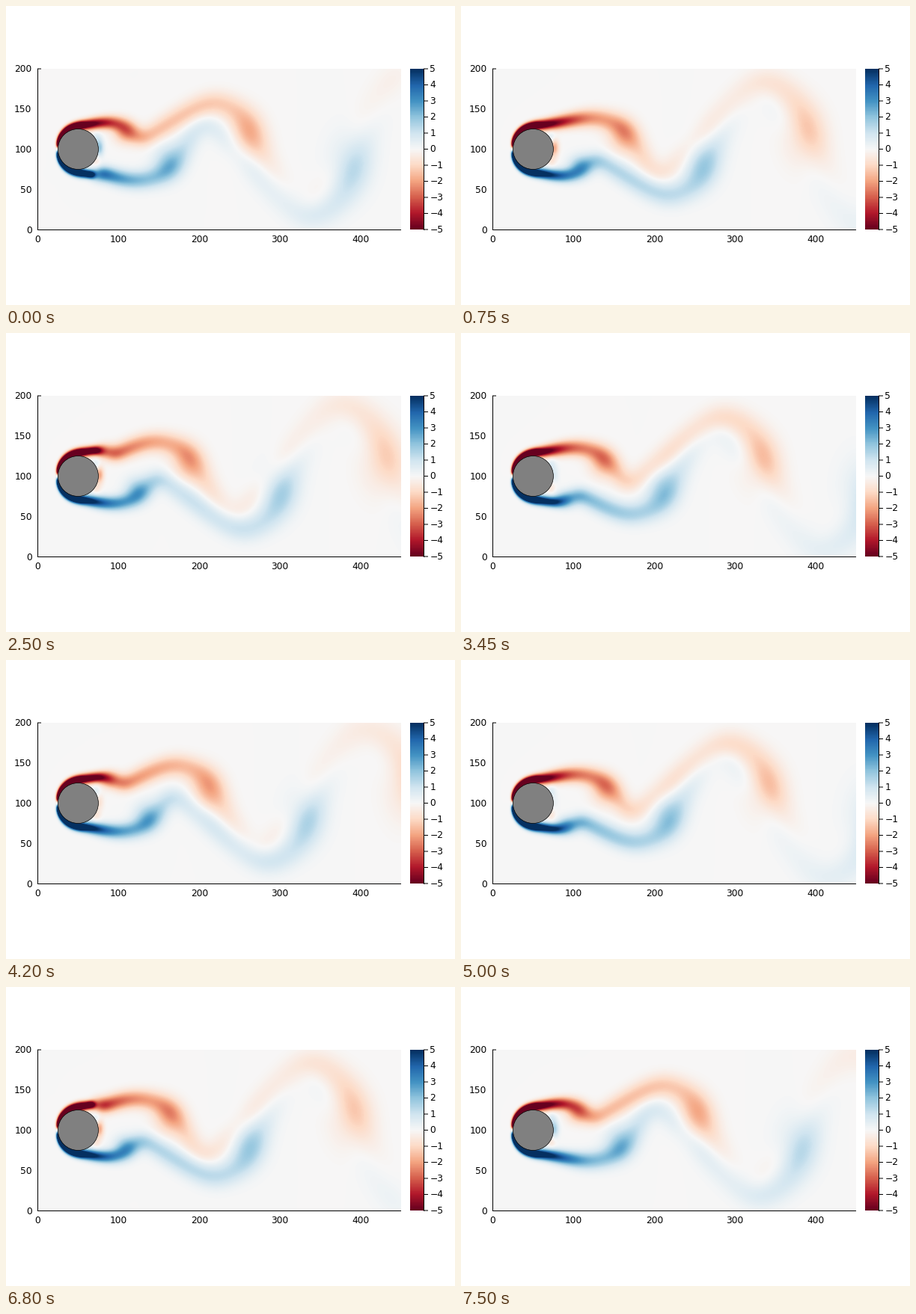
These frames come from a looping animation (600 px wide and 400 px high, 7.55 s). A matplotlib script:

```python
import numpy as np
import matplotlib.pyplot as plt
from matplotlib.animation import FuncAnimation
from matplotlib.patches import Circle

FRAMES, INTERVAL = 151, 50
PERIOD = 30.2                       # shedding period in frames
LEFT, RIGHT, TOP, BOTTOM = 43, 528, 84, 299
MID = (TOP + BOTTOM) / 2
CX, RADIUS = 96.4, 27

X = np.arange(LEFT, RIGHT) + 0.5
V = MID - (np.arange(TOP, BOTTOM) + 0.5)   # height above the centre line


def logistic(u):
    return 1 / (1 + np.exp(-u))


def drift(age, start, slow, gain, when, ease):
    """Position that speeds up smoothly from `slow` to `slow + gain`."""
    return start + slow * age + gain * ease * np.log1p(np.exp((age - when) / ease))


# Three landmarks of a vortex by age: x, height, log strength, width
def crest(age):
    return (drift(age, 134, 1.2, 7.4, 16, 5), 34 + 72 * logistic((age - 34) / 9),
            np.log(4) - age / 27, 6 + 0.17 * age)


def head(age):
    return (drift(age, 168, 3.2, 6.15, 20, 5), 20 + 15 * logistic(-(age + 4) / 3),
            np.log(2) - age / 50, 9 + 0.14 * age)


def foot(age):
    return (drift(age, 178, 3.2, 6.4, 11, 6), 38 - 136 * logistic((age - 14) / 9),
            np.log(1.6) - age / 15, 8.5 + 0.1 * age)


def core(age):
    """Soft rolled-up patch inside the head: x, height, strength, widths."""
    x, v, _, _ = head(age)
    strength = 1.5 * np.exp(-age / 70) * logistic((age + 6) / 3)
    return x - 10, v - 3, strength, 10.5 + 0.2 * age, 9.5 + 0.42 * age


def splat(x, v, weight, sx, sv=None):
    """Sum of Gaussian spots on the pixel grid."""
    x, v, weight, sx, sv = (np.atleast_1d(q)[:, None]
                            for q in (x, v, weight, sx, sx if sv is None else sv))
    gx = np.exp(-0.5 * ((X - x) / sx) ** 2)
    gv = np.exp(-0.5 * ((V - v) / sv) ** 2)
    return (gv * weight).T @ gx


def ribbon(x, v, strength, length, width):
    return splat(x, v, strength * length / (width * np.sqrt(2 * np.pi)), width)


def attached_layer(n=80):
    """Thin layer clinging to the front of the cylinder."""
    t = (np.arange(n) + 0.5) / n
    ang = np.radians(177 - 95 * t)
    r = RADIUS + 0.3 + 4.5 * t
    return ribbon(CX + r * np.cos(ang), r * np.sin(ang),
                  8.5 * (1 - np.exp(-t / 0.08)), r * np.radians(95) / n, 1.4 + 2.7 * t)


LAYER = attached_layer()
REAR = splat(125, 2, 1, 4, 8)
CORNERS = splat(121, 16, 0.6, 4, 6) - splat(121, -16, 0.6, 4, 6)


def hermite(a, b, ma, mb, t):
    return ((2 * t**3 - 3 * t**2 + 1) * a + (t**3 - 2 * t**2 + t) * ma
            + (3 * t**2 - 2 * t**3) * b + (t**3 - t**2) * mb)


def nodes_of(age):
    """Landmarks with the direction the ribbon takes through each."""
    k, h, f = crest(age), head(age), foot(age)
    dx = h[0] - k[0]
    return [(k, (1.25 * dx, 0)),
            (h, (0.5 * dx, 1.7 * (h[1] - k[1]))),
            (f, (1.2 * (f[0] - h[0]), 0))]


def wake(phase, n=26):
    """Strength of the upper shear layer and the vortices it has shed."""
    phase %= PERIOD
    ages = [a for a in phase + PERIOD * np.arange(-1, 2) if a >= -PERIOD / 2]
    nodes = [node for a in ages for node in nodes_of(a)]
    nodes.append(nodes_of(phase + 2 * PERIOD)[0])
    nodes.insert(0, ((100, 32, np.log(7.5), 4.2), (nodes[0][0][0] - 100, 2)))

    t = (np.arange(n) + 0.5) / n
    e = 1e-3
    parts = []
    for (a, ma), (b, mb) in zip(nodes, nodes[1:]):
        def point(u):
            return [hermite(a[j], b[j], ma[j], mb[j], u) for j in (0, 1)]
        x, v = point(t)
        (x0, v0), (x1, v1) = point(t - e), point(t + e)
        length = np.hypot(x1 - x0, v1 - v0) / (2 * e * n)
        strength = np.exp(a[2] + (b[2] - a[2]) * t)
        parts.append([x, v, strength, length, a[3] + (b[3] - a[3]) * t])

    line_part = ribbon(*(np.concatenate(col) for col in zip(*parts)))
    return LAYER + line_part + splat(*core(np.array(ages)))


def vorticity(frame):
    swing = 2.2 * np.cos(2 * np.pi * (frame - 2.5) / PERIOD)
    lower = wake(frame + PERIOD / 2)[::-1]
    return lower - wake(frame) + swing * REAR + CORNERS


fig = plt.figure(figsize=(6, 4), dpi=100, facecolor="white")
ax = fig.add_axes([0, 0, 1, 1])
ax.axis("off")

view = dict(cmap="RdBu", vmin=-5, vmax=5, interpolation="nearest", aspect="auto")
image = ax.imshow(vorticity(0), extent=(LEFT, RIGHT, BOTTOM, TOP), **view)
ax.imshow(np.linspace(5, -5, BOTTOM - TOP)[:, None], extent=(540, 558, BOTTOM, TOP), **view)
ax.set_xlim(0, 600)
ax.set_ylim(400, 0)

ax.add_patch(Circle((CX, MID), RADIUS, fc="#808080", ec="black", lw=0.5, zorder=3))


def line(xs, ys):
    ax.plot(xs, ys, color="black", lw=0.72, solid_capstyle="butt", snap=False, zorder=4)


def label(x, y, text, ha):
    ax.text(x, y, text, ha=ha, va="center", family="DejaVu Sans", fontsize=8.8)


line([42.5, 42.5], [84, 300])
line([42, 528], [299.5, 299.5])
line([42, 47], [84, 84])
line([558.5, 558.5], [84, 300])

for val in range(0, 201, 50):
    label(34.5, 300 - 1.0775 * val, str(val), "right")
for val in range(0, 401, 100):
    label(42.5 + 1.079 * val, 312, str(val), "center")
for val in range(-5, 6):
    y = MID - 21.5 * val
    line([558, 564], [y, y])
    label(566.3, y + 0.3, str(val).replace("-", "\u2212"), "left")


def update(frame):
    image.set_data(vorticity(frame))
    return [image]


anim = FuncAnimation(fig, update, frames=FRAMES, interval=INTERVAL,
                     repeat=True, repeat_delay=0)
plt.show()
```
